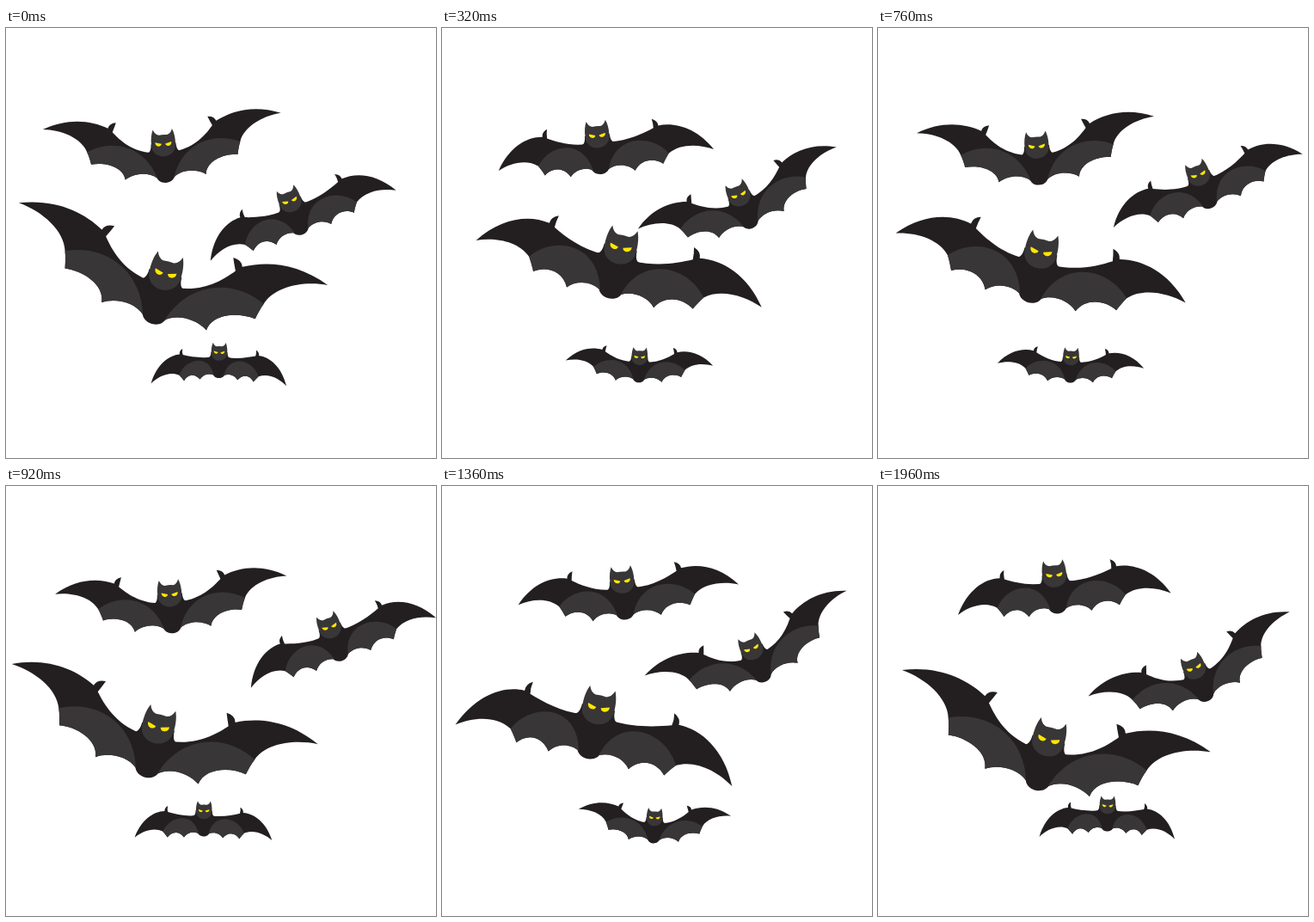
These frames come from a looping animation (500x500 px, 2000 ms). An HTML page with a canvas:

```html
<!DOCTYPE html>
<html lang="en">
<head>
<meta charset="utf-8">
<title>Flying bats</title>
<style>
  html, body { margin: 0; width: 100%; height: 100%; overflow: hidden; background: #fff; }
  canvas { display: block; width: 500px; height: 500px; }
</style>
</head>
<body>
<canvas id="stage" width="500" height="500"></canvas>
<script>
const ctx = document.getElementById('stage').getContext('2d');
const LOOP = 2000, STEP = 40;
const DARK = '#231f20', GREY = '#383637', YELLOW = '#ffe600';

// Right wing, raised and lowered; the origin is the centre of the head.
const LOWER_EDGE_UP = 'C 90 9 89 14 88 19 C 72 17 50 24 48.5 40 C 38 33 20 32 10 41';
const LOWER_EDGE_DOWN = 'C 69 46 66 49 63 53 C 57 42 45 38 34 50 C 29 41 18 38 9 42';
const WING = {
  up: 'M 0 10 L 14 10 C 38 7 52 -8 60 -18 Q 57 -24 55 -29 Q 63 -29 65 -23 ' +
      'C 85 -34 112 -39 143 -27 C 120 -25 97 -13 92 4 ' + LOWER_EDGE_UP + ' L 0 44 Z',
  down: 'M 0 10 L 14 9 C 32 12 52 9 66 6 Q 68 1 67 -5 Q 73 -1 72 5 ' +
        'C 92 7 114 25 123 59 C 110 46 90 36 72 43 ' + LOWER_EDGE_DOWN + ' L 0 44 Z'
};
const MEMBRANE = {
  up: 'M 10 41 C 22 2 60 -11 92 4 ' + LOWER_EDGE_UP + ' Z',
  down: 'M 9 42 C 18 2 62 12 72 43 ' + LOWER_EDGE_DOWN + ' Z'
};
const BODY = new Path2D('M-15 0C-15 8-18 10-20 10L-11 38C-10 50 10 50 11 38L20 10C18 10 15 8 15 0Z');
const HEAD = new Path2D('M-14.5 1C-14.8-7-13.5-13-11.5-17.3Q-9.5-11.5-5-10.5Q0-11.3 5-10.5' +
  'Q9.5-11.5 11.5-17.3C13.5-13 14.8-7 14.5 1C14.5 20-14.5 20-14.5 1Z');
const EYE = new Path2D('M2.2 .2L9.8-2C10.2 3.5 3 4.5 2.2 .2Z');

// beat is the wing phase in degrees; y is the flight path without the bob.
const TIMES = [0, 160, 520, 760, 1120, 1640, 1960];
const BATS = [
  { scale: 0.97, low: 0.24, bob: 8, lean: 0.09, tilt: -6.5, sway: 2.5,
    x: [183, 178, 184.5, 184.5, 199, 217.5, 205],
    y: [126.5, 129, 132, 129.5, 113, 115, 110.5],
    beat: [0, 65, 235, 342, 514, 720, 880] },
  { scale: 0.9, low: 0.2, bob: 12, lean: 0.05, tilt: -20, sway: -3,
    x: [330, 333, 361, 372.5, 375.5, 344, 367.5],
    y: [210.7, 200.5, 175, 176, 173.3, 188, 202],
    beat: [148, 245, 360, 480, 667, 858, 1039] },
  { scale: 1.3, low: 0, bob: 22, lean: 0.05, tilt: 12, sway: 2.9,
    x: [185.5, 198.5, 213, 189.5, 169.5, 200.5, 198.5],
    y: [263, 258, 260.5, 259, 264.5, 277.5, 273],
    beat: [0, 40, 180, 272, 400, 593, 709] },
  { scale: 0.64, low: 0, bob: 6, lean: 0, tilt: 1, sway: 2,
    x: [248, 240, 219.5, 224.5, 238, 257.5, 267],
    y: [383, 382, 381.5, 382.5, 382, 381.4, 377.5],
    beat: [180, 213, 360, 450, 575, 773, 900] }
];

// Smooth curve through values given at TIMES.
function along(values, t) {
  const last = TIMES.length - 1;
  let i = 0;
  while (i < last - 1 && t >= TIMES[i + 1]) i++;
  const slope = k => {
    const a = Math.max(k - 1, 0), b = Math.min(k + 1, last);
    return (values[b] - values[a]) / (TIMES[b] - TIMES[a]);
  };
  const span = TIMES[i + 1] - TIMES[i];
  const u = (t - TIMES[i]) / span, v = 1 - u;
  return values[i] * v * v * (1 + 2 * u) + slope(i) * span * u * v * v +
    values[i + 1] * u * u * (3 - 2 * u) - slope(i + 1) * span * u * u * v;
}

function blend(shape, lift) {
  const up = shape.up.split(' ');
  const mixed = shape.down.split(' ').map((token, i) =>
    isNaN(token) ? token : +token + (up[i] - token) * lift);
  return new Path2D(mixed.join(' '));
}

function fill(path, color) {
  ctx.fillStyle = color;
  ctx.fill(path);
}

function mirrored(draw) {
  for (const side of [-1, 1]) {
    ctx.save();
    draw(side);
    ctx.restore();
  }
}

function drawBat(bat, t) {
  const wave = Math.cos(along(bat.beat, t) * Math.PI / 180);
  const lift = 1 - (1 - bat.low) * (1 - wave) / 2;
  const wing = blend(WING, lift), membrane = blend(MEMBRANE, lift);
  ctx.save();
  ctx.translate(along(bat.x, t), along(bat.y, t) + bat.bob * wave);
  ctx.rotate((bat.tilt + bat.sway * lift) * Math.PI / 180);
  ctx.scale(bat.scale, bat.scale);
  fill(BODY, DARK);
  mirrored(side => {
    ctx.scale(side + bat.lean * (1 - lift), 1);
    fill(wing, DARK);
    fill(membrane, GREY);
  });
  fill(HEAD, GREY);
  mirrored(side => {
    ctx.scale(side, 1);
    fill(EYE, YELLOW);
  });
  ctx.restore();
}

function render(t) {
  ctx.fillStyle = '#fff';
  ctx.fillRect(0, 0, 500, 500);
  for (const bat of BATS) drawBat(bat, t);
}

let start;
function tick(now) {
  if (start === undefined) start = now;
  render(Math.floor(((now - start) % LOOP) / STEP) * STEP);
  requestAnimationFrame(tick);
}
render(0);
requestAnimationFrame(tick);
</script>
</body>
</html>
```
